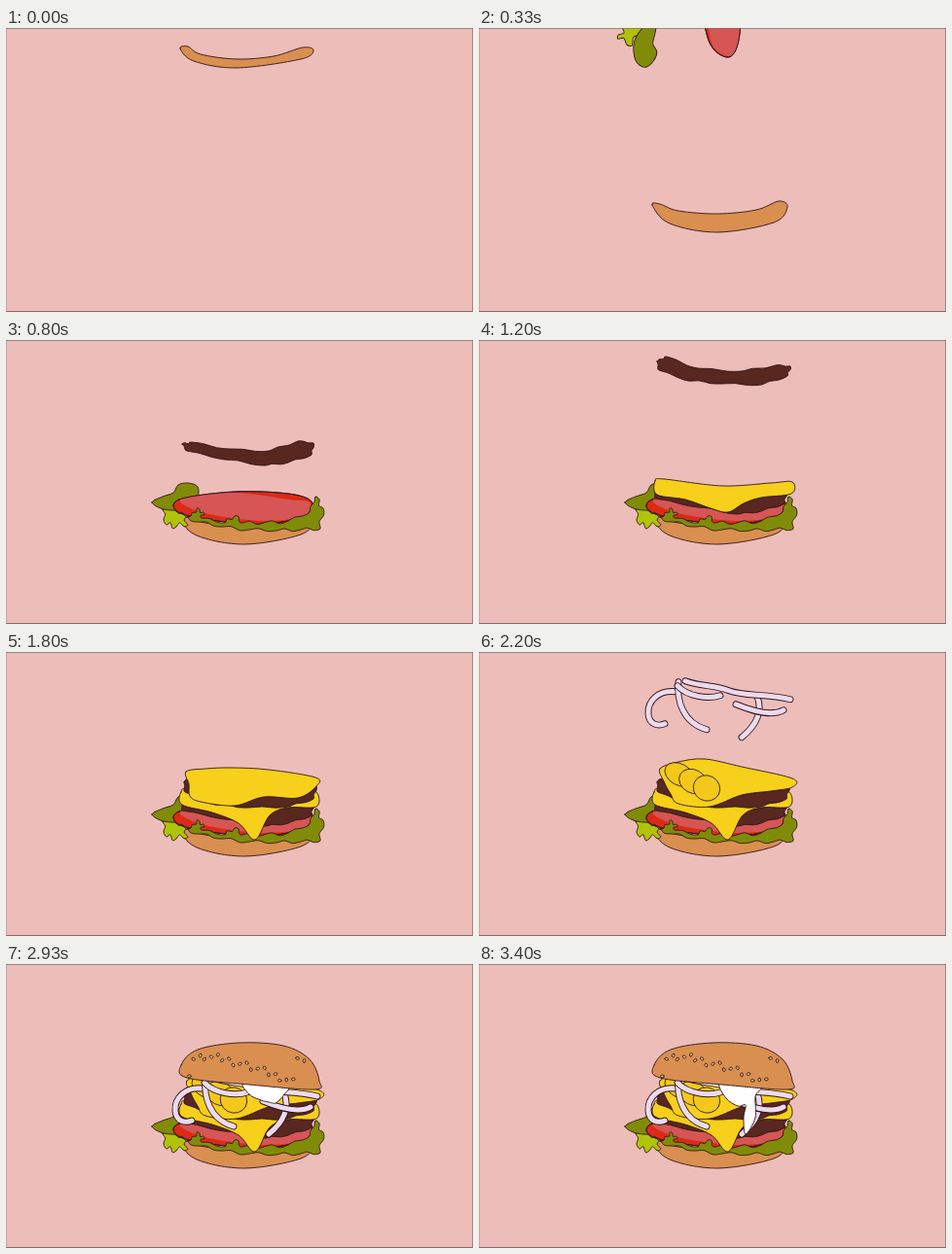
These frames come from a looping animation (480 by 292 pixels, 3.94 s). An HTML page with a canvas:

```html
<!DOCTYPE html>
<html lang="en">
<head>
<meta charset="utf-8">
<title>Burger stack</title>
<style>
html, body { margin: 0; width: 100%; height: 100%; overflow: hidden; background: #edbdb9; }
canvas { display: block; }
</style>
</head>
<body>
<canvas id="stage" width="480" height="292"></canvas>
<script>
const ctx = document.getElementById('stage').getContext('2d');
const LOOP = 3940, STEP = 200 / 3, LAST_STEP = 51;
const INK = '#32161a', BUN = '#d98f50', MEAT = '#572720', CHEESE = '#f6d01a';
const LEAF = '#808c08', LIME = '#b0c209', RED = '#dd2a14', ROSE = '#d65555', ONION = '#ecdbee';

const nums = text => text.trim().split(/\s+/).map(Number);
const mix = (a, b, p) => a.map((v, i) => v + (b[i] - v) * p);
const noise = i => Math.abs(Math.sin(i * 91.7) * 437.5) % 1;
const gravity = (t, start, end) => Math.min(1, Math.max(0, (t - start) / (end - start))) ** 1.3;

// Splits every edge in three and pushes the new points alternately out and in.
function ruffle(p, amount) {
  const out = [], n = p.length;
  for (let i = 0; i < n; i += 2) {
    const x = p[i], y = p[i + 1], dx = p[(i + 2) % n] - x, dy = p[(i + 3) % n] - y;
    const length = Math.hypot(dx, dy) || 1;
    out.push(x, y);
    for (const [part, side] of [[1 / 3, 1], [2 / 3, -1]]) {
      const push = side * amount * (0.4 + noise(i + part)) / length;
      out.push(x + dx * part + dy * push, y + dy * part - dx * push);
    }
  }
  return out;
}

// Closed Catmull-Rom curve through all points.
function outline(p) {
  const path = new Path2D(), n = p.length, at = i => p[(i + n) % n];
  path.moveTo(p[0], p[1]);
  for (let i = 0; i < n; i += 2) {
    const [x1, y1] = [0, 1].map(k => at(i + k) + (at(i + 2 + k) - at(i - 2 + k)) / 6);
    const [x2, y2] = [2, 3].map(k => at(i + k) - (at(i + 2 + k) - at(i - 2 + k)) / 6);
    path.bezierCurveTo(x1, y1, x2, y2, at(i + 2), at(i + 3));
  }
  path.closePath();
  return path;
}

function paint(path, fill, line = INK) {
  if (fill) { ctx.fillStyle = fill; ctx.fill(path); }
  if (line) { ctx.strokeStyle = line; ctx.lineWidth = 0.9; ctx.stroke(path); }
}

// A filled shape that may morph into another one between two times.
function shape(fill, from, { to = from, span = [0, 1], rough = 0, line = INK } = {}) {
  const a = nums(from), b = nums(to);
  return t => {
    const points = mix(a, b, gravity(t, ...span));
    paint(outline(rough ? ruffle(points, rough) : points), fill, line);
  };
}

function band(d) {
  const path = new Path2D(d);
  return () => {
    for (const [color, width] of [[INK, 6.8], [ONION, 5]]) {
      ctx.strokeStyle = color;
      ctx.lineWidth = width;
      ctx.stroke(path);
    }
  };
}

function disc(x, y, rx, ry, fill, tilt = 0) {
  const path = new Path2D();
  path.ellipse(x, y, rx, ry, tilt, 0, 7);
  paint(path, fill);
}

function pickles() {
  for (let i = 0; i < 3; i++) disc(206 + 14 * i, 126 + 7 * i, 16 - i, 11 + i, '#f3c81a', 0.5);
}

function seeds() {
  for (let i = 0; i < 21; i++) {
    const u = (i * 0.618 % 1) * 1.84 - 0.92;
    const height = 36 * Math.sqrt(1 - u * u * 0.85);
    disc(251 + 68 * u, 119 + 4 * u - height * (i * 0.37 % 1), 1.9, 1.4, '#e9b878', i);
  }
}

// Poses are [time, dx, dy, degrees] relative to rest.
const drop = (start, land, dy, dx = 0, turn = 0) => [[start, dx, dy, turn], [land, 0, 0, 0]];

function poseAt(keys, t) {
  if (t < keys[0][0] - 1) return null;
  const next = keys.findIndex(key => key[0] > t);
  if (next < 1) return keys[next < 0 ? keys.length - 1 : 0].slice(1);
  const a = keys[next - 1], b = keys[next];
  return mix(a, b, gravity(t, a[0], b[0])).slice(1);
}

const tomatoRound = '180 162 225 153 275 153 306 161 313 173 295 188 245 191 188 184';
const tomatoFlat = '178 164 235 156 290 158 314 166 309 180 270 189 225 187 179 178';
const topple = [530, 733];

// Back to front.
const parts = [
  { keys: [[0, 0, 0, 0]], draw: [
    shape(BUN, '179 21 187 19 200 27 237 32 275 29 305 20 316 23 303 32 237 41 193 34', {
      to: '178 182 186 181 205 188 245 191 285 187 308 178 317 184 303 200 245 210 196 201',
      span: [0, 220] })] },

  { pivot: [173, 171], keys: [[270, -8, -185, 130], [530, 0, -38, 80], [667, 0, 0, 0]], draw: [
    shape(LIME, '161 174 185 174 187 190 175 192 165 190', { rough: 2.5 }),
    shape(LEAF, '150 167 161 161 172 157 177 149 187 147 197 151 196 163 181 174 162 174')] },

  { pivot: [246, 172], keys: [[270, 0, -240, 85], [530, 4, -45, 75], [733, 0, 0, 0]], draw: [
    shape(RED, tomatoRound, { to: tomatoFlat, span: topple }),
    shape(ROSE, '187 163 225 153 275 153 306 161 312 172 295 186 245 184 195 174', {
      to: '181 163 235 157 290 164 312 167 306 181 270 186 225 182 192 174', span: topple, line: null }),
    shape(null, tomatoRound, { to: tomatoFlat, span: topple })] },

  { keys: [[400, 0, -205, 0], [530, 0, -127, 0], [733, 0, 0, 0]], draw: [
    shape(LEAF, `177 178 190 181 196 173 203 177 201 183 225 188 235 181 243 188 265 188
      290 186 312 177 318 161 326 173 323 194 303 195 278 196 250 195 222 192 198 187`, { rough: 1.6 })] },

  { keys: drop(667, 800, -98), draw: [
    shape(MEAT, '181 107 190 105 230 112 270 114 300 104 316 106 314 118 290 126 266 129 225 123 186 114', {
      to: '180 152 190 148 230 152 270 152 300 148 316 156 314 168 290 176 266 179 225 172 182 163',
      span: [800, 867], rough: 0.8 })] },

  { keys: drop(1000, 1133, -138), draw: [
    shape(CHEESE, '181 145 190 143 250 150 300 147 322 146 321 158 290 162 272 168 256 177 238 173 212 164 183 159', {
      to: '180 144 190 140 250 144 300 142 319 144 319 159 290 160 271 168 256 193 239 176 212 165 181 157',
      span: [1200, 1400] })] },

  { keys: drop(1133, 1200, -22), draw: [
    shape(MEAT, '183 22 192 17 225 29 270 32 305 26 320 27 317 37 290 46 250 45 215 42 185 31', {
      to: '183 134 190 127 225 130 270 130 305 128 319 138 316 151 290 159 250 160 215 157 184 144',
      span: [1200, 1400], rough: 0.8 })] },

  { pivot: [253, 138], keys: drop(1467, 1667, -125, -18), draw: [
    shape(CHEESE, '185 123 205 120 232 119 270 121 318 129 319 138 300 150 265 149 235 158 200 154 189 148 188 136', {
      to: '186 120 205 113 232 110 270 118 322 130 322 139 300 143 270 147 237 159 205 156 197 146 190 133',
      span: [1867, 2067] })] },

  { pivot: [220, 133], keys: drop(1867, 2067, -125, -35, -20), draw: [pickles] },

  { keys: drop(2133, 2333, -115), draw: [
    'M202 128C184 126 173 138 174 151C175 162 184 164 191 161',
    'M205 118C203 136 209 160 234 167',
    'M286 133C293 152 281 166 270 175',
    'M212 117C228 123 242 121 257 127S295 130 320 136',
    'M204 122C214 133 235 136 248 132',
    'M264 141C286 150 302 153 313 147'].map(band) },

  { keys: drop(2400, 2533, -95), draw: [
    shape('#ffffff', '243 121 268 119 290 126 286 134 281 140 277 143 274 143 270 142 262 140 250 134', {
      to: '247 122 268 119 290 126 284 136 284 158 274 175 272 158 274 145 266 146 254 138',
      span: [3000, 3400] })] },

  { keys: drop(2733, 2933, -125), draw: [
    shape(BUN, '180 104 197 88 240 81 285 84 312 98 322 120 317 129 250 124 186 117'),
    seeds] }
];

function render(t) {
  ctx.fillStyle = '#edbdb9';
  ctx.fillRect(0, 0, 480, 292);
  ctx.lineCap = ctx.lineJoin = 'round';
  for (const { keys, pivot: [x, y] = [0, 0], draw } of parts) {
    const pose = poseAt(keys, t);
    if (!pose) continue;
    const [dx, dy, angle] = pose;
    ctx.save();
    ctx.translate(x + dx, y + dy);
    ctx.rotate(angle * Math.PI / 180);
    ctx.translate(-x, -y);
    draw.forEach(layer => layer(t));
    ctx.restore();
  }
  ctx.strokeStyle = '#86686a';
  ctx.lineWidth = 1;
  ctx.strokeRect(0.2, 0.2, 479.6, 291.3);
}

let start;
function tick(now) {
  start ??= now;
  const ticks = Math.floor((now - start) % LOOP / 10);
  const step = Math.min(LAST_STEP, Math.floor((ticks + 0.4) * 10 / STEP));
  render(step * STEP);
  requestAnimationFrame(tick);
}
render(0);
requestAnimationFrame(tick);
</script>
</body>
</html>
```
